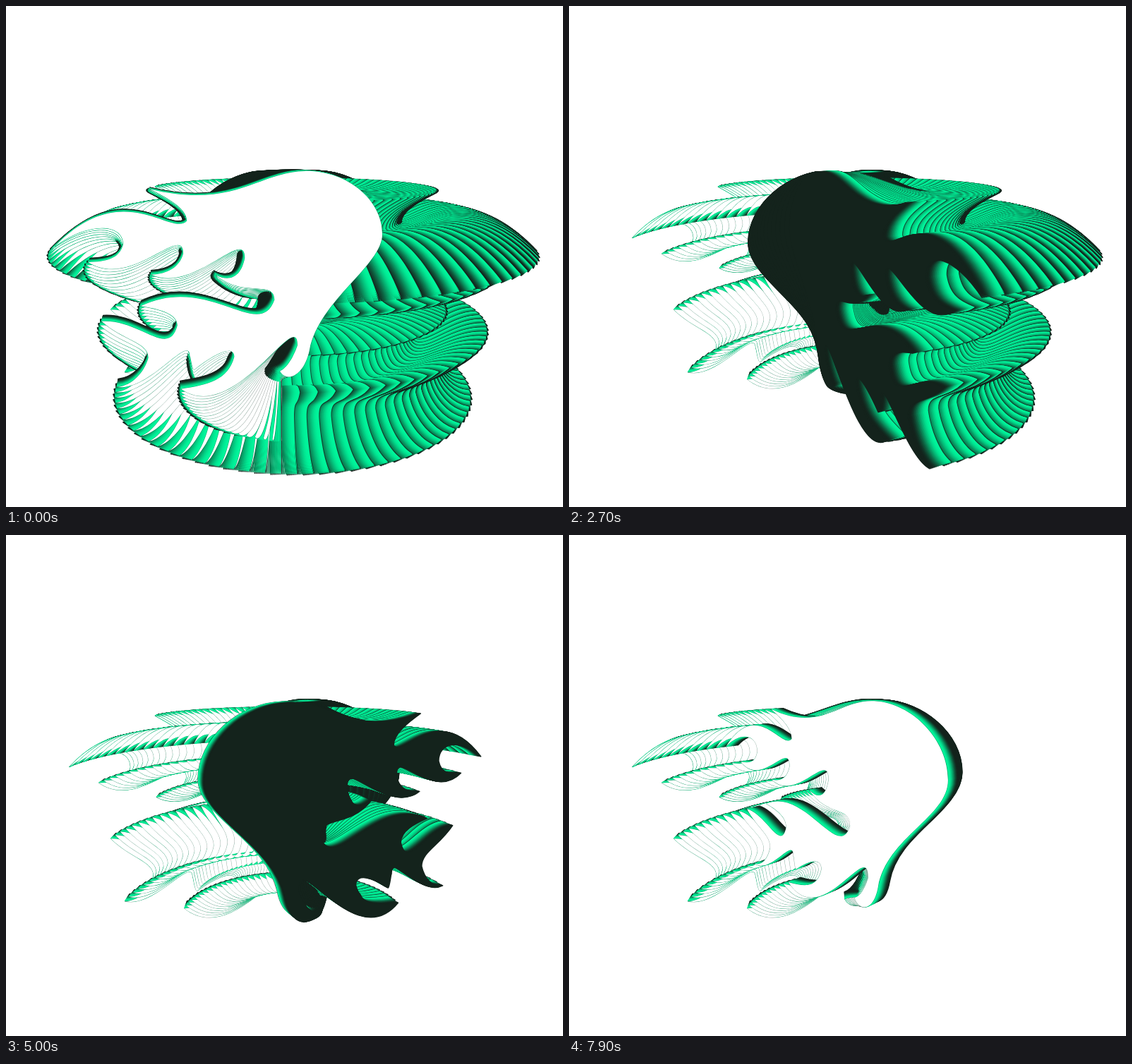
An HTML page with a canvas that plays this animation: 789x710 px, repeating every 8 s.

```html
<!DOCTYPE html>
<html lang="en">
<head>
<meta charset="utf-8">
<title>Turning flame</title>
<style>
html, body { margin: 0; width: 100%; height: 100%; overflow: hidden; background: #fff; }
canvas { display: block; }
</style>
</head>
<body>
<canvas id="stage" width="789" height="710"></canvas>
<script>
const W = 789, H = 710;
const FRAME = 100, FRAMES = 80;
const LAYERS = 91, STEP = 3.87, START = 167;   // degrees
const WHITE_AT = 15, DARK_AT = 42, SLICES = 20; // the two faces of a slab
const EYE = { x: 394.5, y: 188, d: 815 }, AXIS = 10.5;
const GREEN = [0, 245, 155], DARK = [20, 35, 28];
const SAVE_EVERY = 8;

// Points are [distance from the axis, depth below the horizon].
const CHIN = [14, 334];
const flame = (tip, sag, notch, lift) => ({ tip, sag, notch, lift });
const FLAMES = [
  flame([196, 69], 12, [146, 114], 92),
  flame([318, 142], -30, [231, 143], 0),
  flame([276, 165], 40, [151, 159], 0),
  flame([194, 186], 30, [65, 169], -12),
  flame([106, 191], 35, [22, 231], 40),
  flame([208, 228], 5, [159, 258], 0),
  flame([259, 245], 28, [198, 299], 0),
  flame([239, 335], 10, [142, 302], 0),
  flame([136, 321], -18, [80, 308], 2),
  flame([154, 346], 60, [-12, 299], 4)
];
const HEAD = [
  [[5, 352], [-22, 345], [-30, 307]],
  [[-45, 235], [-143, 190], [-143, 143]],
  [[-143, 92], [-88, 47], [-23, 47]],
  [[45, 47], [80, 100], FLAMES[0].tip]
];

// Lower edge of a flame, from its tip into the round notch.
function lowerEdge({ tip, sag, notch }) {
  const run = tip[0] - notch[0];
  return [
    [tip[0] - 0.45 * run, tip[1] + sag],
    [notch[0], notch[1] - 0.35 * run],
    notch
  ];
}

// Upper edge of the next flame, out of the notch to its tip.
function upperEdge({ notch, lift }, tip) {
  const run = tip[0] - notch[0];
  return [
    [notch[0] + 0.12 * run, notch[1] + 0.45 * run - 0.6 * lift],
    [tip[0] - 0.5 * run, tip[1] - lift],
    tip
  ];
}

const outline = [...HEAD, ...FLAMES.flatMap((f, i) => {
  const next = FLAMES[i + 1];
  return [lowerEdge(f), upperEdge(f, next ? next.tip : CHIN)];
})];

function slicePath(angle, offset) {
  const c = Math.cos(angle), s = Math.sin(angle);
  const project = ([u, v]) => {
    const scale = EYE.d / (EYE.d - u * s - offset * c);
    return [EYE.x + (AXIS + u * c - offset * s) * scale, EYE.y + v * scale];
  };
  const path = new Path2D();
  path.moveTo(...project(CHIN));
  for (const curve of outline) path.bezierCurveTo(...curve.flatMap(project));
  path.closePath();
  return path;
}

// Wall colour: 0 beside the white face, 1 beside the dark face.
function wallColor(p) {
  const q = Math.min(1, Math.max(0, (p - 0.05) / 0.85));
  const k = q * q * (3 - 2 * q);
  return `rgb(${GREEN.map((g, i) => Math.round(g + (DARK[i] - g) * k))})`;
}

function paint(ctx, path, fill, line, width) {
  ctx.fillStyle = fill;
  ctx.strokeStyle = line;
  ctx.lineWidth = width;
  ctx.stroke(path);
  ctx.fill(path);
}

function drawLayer(ctx, n) {
  const angle = (START - STEP * n) * Math.PI / 180;
  const side = AXIS * Math.sin(angle) + EYE.d * Math.cos(angle);
  const darkSide = side > (WHITE_AT + DARK_AT) / 2;
  ctx.lineJoin = 'round';
  for (let i = 0; i <= SLICES; i++) {
    const p = darkSide ? i / SLICES : 1 - i / SLICES;
    const path = slicePath(angle, WHITE_AT + p * (DARK_AT - WHITE_AT));
    const color = wallColor(p);
    if (p > 0) paint(ctx, path, color, color, 1.4);
    else if (darkSide) paint(ctx, path, color, 'rgba(20,35,28,.7)', 1.8);
    else paint(ctx, path, '#fff', 'rgba(20,35,28,.4)', 1);
  }
}

function newCanvas() {
  const canvas = document.createElement('canvas');
  canvas.width = W;
  canvas.height = H;
  return canvas;
}

// Stacks saved at regular intervals, so each picture needs few new layers.
const saved = [];
const work = newCanvas(), workCtx = work.getContext('2d');
workCtx.fillStyle = '#fff';
workCtx.fillRect(0, 0, W, H);
for (let n = LAYERS - 1; n >= 0; n--) {
  drawLayer(workCtx, n);
  if (n % SAVE_EVERY === 0) {
    const copy = newCanvas();
    copy.getContext('2d').drawImage(work, 0, 0);
    saved[n / SAVE_EVERY] = copy;
  }
}

const stage = document.getElementById('stage').getContext('2d');
const t0 = performance.now();
let shown = -1;

function tick() {
  const n = Math.floor((performance.now() - t0) / FRAME) % FRAMES;
  if (n !== shown) {
    const base = Math.ceil(n / SAVE_EVERY);
    stage.drawImage(saved[base], 0, 0);
    for (let k = base * SAVE_EVERY - 1; k >= n; k--) drawLayer(stage, k);
    shown = n;
  }
  requestAnimationFrame(tick);
}
tick();
</script>
</body>
</html>
```
